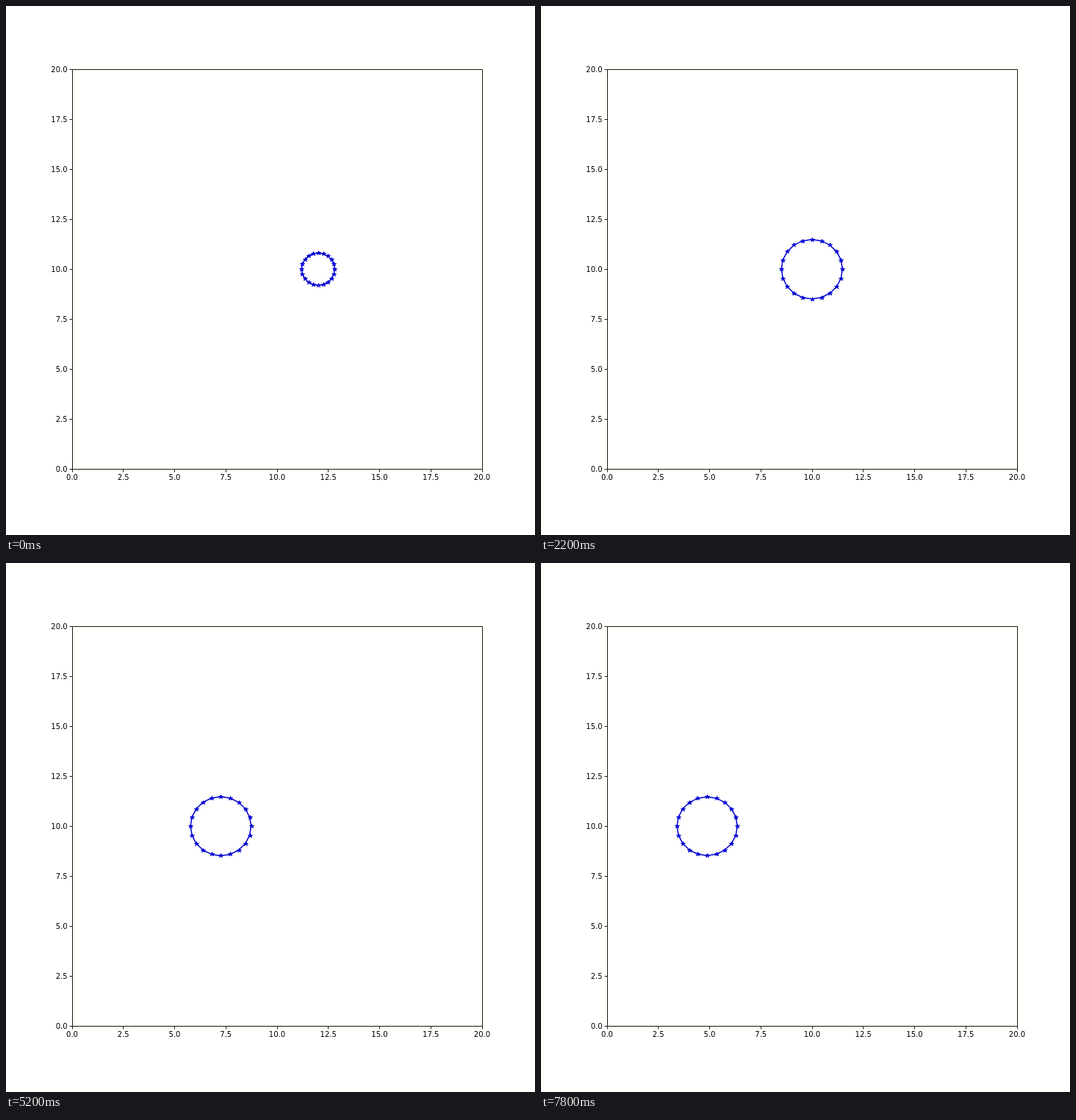
An HTML page for the animation above (8 s loop, 720 px wide and 720 px high).

```html
<!DOCTYPE html>
<html lang="en">
<head>
<meta charset="utf-8">
<title>Pulsing ring</title>
<style>
  html, body { margin: 0; width: 100%; height: 100%; overflow: hidden; background: #fffffe; }
  svg { display: block; width: 100%; height: 100%; }
  .axes { fill: none; stroke: #1a1a0c; stroke-width: 1; }
  text { font: 10px "DejaVu Sans", sans-serif; fill: #000; }
  .xlabel { text-anchor: middle; }
  .ylabel { text-anchor: end; }
  #ring { fill: none; stroke: #0000d2; stroke-width: 1.5; stroke-linejoin: round; }
  #star { fill: #0000d2; stroke: #0000d2; stroke-width: 1; stroke-linejoin: bevel; }
</style>
</head>
<body>
<svg viewBox="0 0 720 720">
  <defs><path id="star"/></defs>
  <g id="plot"></g>
  <path id="ring"/>
  <g id="stars"></g>
</svg>
<script>
const STEP = 200, STEPS = 40, POINTS = 20;
const RAD = Math.PI / 180;
const byId = id => document.getElementById(id);
const px = x => 90 + x * 27.9;
const py = y => 630 - y * 27.18;
const snap = v => Math.floor(v) + 0.5;

function add(parent, tag, attrs, text = "") {
  const node = document.createElementNS("http://www.w3.org/2000/svg", tag);
  for (const name in attrs) node.setAttribute(name, attrs[name]);
  node.textContent = text;
  return parent.appendChild(node);
}

function toPath(points) {
  return "M" + points.map(p => p.map(v => v.toFixed(2)).join(" ")).join("L") + "Z";
}

function drawAxes() {
  const plot = byId("plot");
  let d = "M90.5 86.5H648.5V630.5H90.5Z";
  for (let v = 0; v <= 20; v += 2.5) {
    const x = px(v), y = py(v), label = v.toFixed(1);
    d += `M${snap(x)} 630.5v4M90.5 ${snap(y)}h-4`;
    add(plot, "text", { class: "xlabel", x, y: 645 }, label);
    add(plot, "text", { class: "ylabel", x: 83.6, y: Math.round(y + 3.8) }, label);
  }
  add(plot, "path", { class: "axes", d });
}

drawAxes();
// The star's corners sit on pixel centres, which makes it a little flat.
byId("star").setAttribute("d", toPath(Array.from({ length: 10 }, (_, i) => {
  const r = i % 2 ? 1.146 : 3, a = (i * 36 - 90) * RAD;
  return [snap(r * Math.cos(a) + 0.5), snap(r * Math.sin(a) + 0.5)];
})));
const stars = Array.from({ length: POINTS }, () => add(byId("stars"), "use", { href: "#star" }));

// Damped pulsation whose frequency rises as the swing shrinks.
function radius(k) {
  const phase = (38.24 * k + 0.313 * k * k) * RAD;
  return 1.47 - 0.66 * Math.exp(-0.145 * k) * Math.cos(phase);
}

function draw(k) {
  const cx = 12 - 0.1826 * k, r = radius(k);
  const points = stars.map((_, i) => {
    const a = i * 360 / POINTS * RAD;
    return [px(cx + r * Math.cos(a)), py(10 + r * Math.sin(a))];
  });
  byId("ring").setAttribute("d", toPath(points));
  points.forEach(([x, y], i) =>
    stars[i].setAttribute("transform", `translate(${Math.round(x)} ${Math.round(y)})`));
}

const start = performance.now();
let shown = -1;
function tick() {
  const k = Math.floor((performance.now() - start) / STEP) % STEPS;
  if (k !== shown) draw(shown = k);
  requestAnimationFrame(tick);
}
tick();
</script>
</body>
</html>
```
